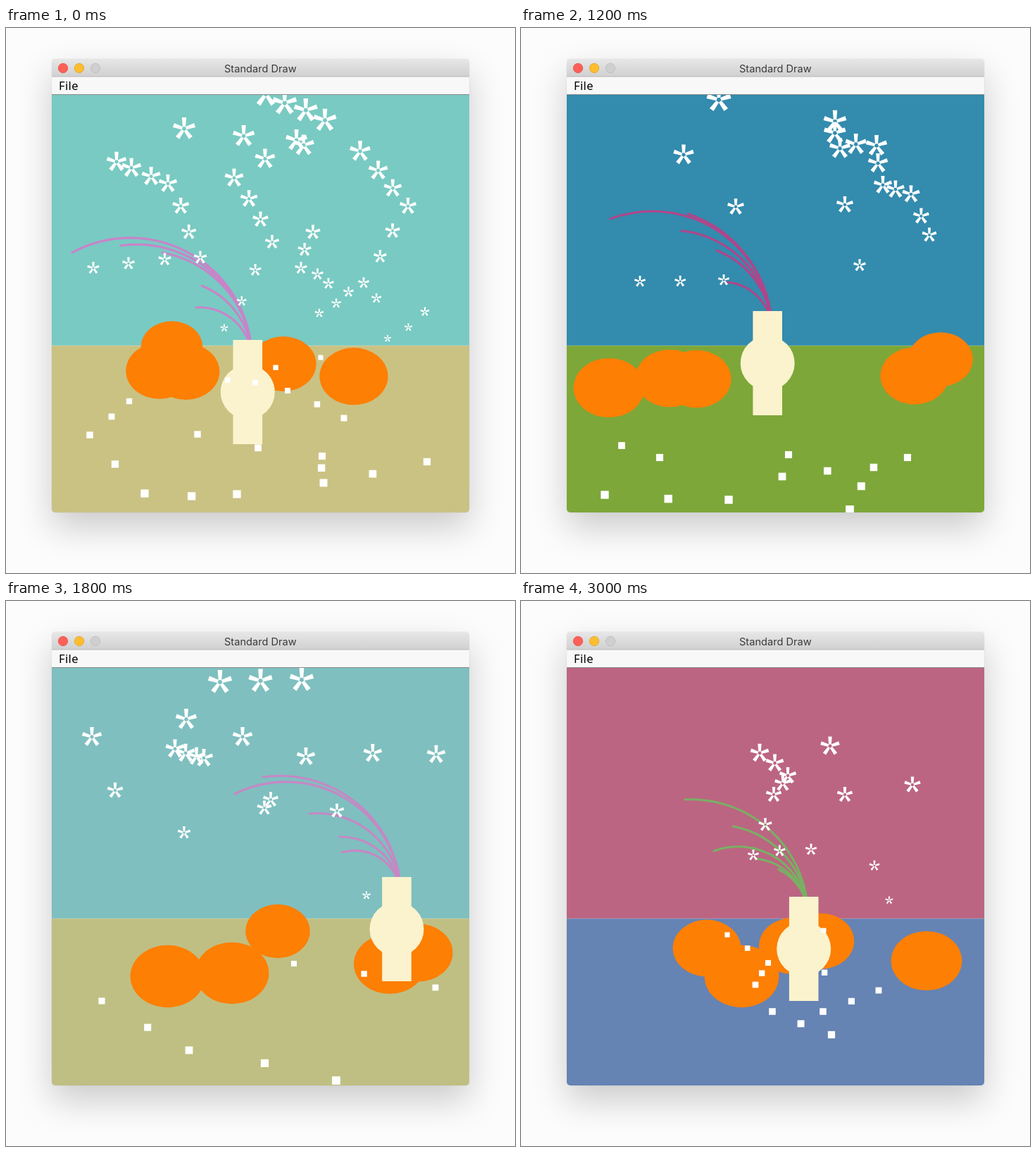
An HTML page that plays this animation: 723x774 px, repeating every 3600 ms.

```html
<!DOCTYPE html>
<html lang="en">
<head>
<meta charset="utf-8">
<title>Standard Draw</title>
<style>
  html, body { margin: 0; width: 100%; height: 100%; overflow: hidden; background: #fcfcfc; }
  .window {
    position: absolute; left: 65px; top: 44px; width: 593px; height: 644px; border-radius: 5px;
    box-shadow: 0 0 1px rgba(0, 0, 0, .3), 0 21px 50px rgba(0, 0, 0, .2);
  }
  svg { position: absolute; left: 0; top: 0; display: block; }
  .scene { visibility: hidden; animation: show 3600ms step-end infinite; }
  @keyframes show {
    0% { visibility: visible; }
    16.6666%, 100% { visibility: hidden; }
  }
</style>
</head>
<body>
<div class="window"></div>
<svg width="723" height="774" viewBox="0 0 723 774">
  <defs>
    <linearGradient id="bar" x2="0" y2="1">
      <stop stop-color="#e7e7e7"/>
      <stop offset="1" stop-color="#d0d0d0"/>
    </linearGradient>
    <clipPath id="frame"><rect x="65" y="44" width="593" height="644" rx="5"/></clipPath>
    <clipPath id="view"><rect x="65" y="94.5" width="593" height="594"/></clipPath>
  </defs>
  <g clip-path="url(#frame)">
    <rect x="65" y="44" width="593" height="25" fill="url(#bar)"/>
    <rect x="65" y="69" width="593" height="25" fill="#f8f8f8"/>
    <rect x="65" y="68.5" width="593" height="1" fill="#bcbcbc"/>
    <g id="canvas" clip-path="url(#view)"></g>
    <rect x="65" y="94" width="593" height="1" fill="#8b8b8b"/>
  </g>
  <g stroke-width=".8">
    <circle cx="81" cy="57" r="6.7" fill="#fc6058" stroke="#e0514a"/>
    <circle cx="104" cy="57" r="6.7" fill="#fdbd2f" stroke="#dfa32b"/>
    <circle cx="127" cy="57" r="6.7" fill="#cfcfcf" stroke="#bababa"/>
  </g>
  <text x="361.3" y="62.5" text-anchor="middle" font-family="Inter, sans-serif" font-size="14.6" fill="#3a3a3a">Standard Draw</text>
  <text x="75" y="88" font-family="'Noto Sans', sans-serif" font-size="16.5" letter-spacing=".4" fill="#000">File</text>
</svg>
<script>
const canvas = document.getElementById('canvas');
let count = 0, seed = 7;

// Seeded random number from -1 to 1
function random() {
  seed = seed * 16807 % 2147483647;
  return seed / 1073741823.5 - 1;
}

function add(parent, tag, attrs) {
  const node = document.createElementNS('http://www.w3.org/2000/svg', tag);
  for (const key in attrs) node.setAttribute(key, attrs[key]);
  return parent.appendChild(node);
}

// Points along a hand-drawn line: each leg is cut into equal steps that stray a little
function trail(steps, ...coords) {
  const points = [];
  for (let i = 0; i + 3 < coords.length; i += 2) {
    const [x0, y0, x1, y1] = coords.slice(i, i + 4);
    for (let k = 0; k < steps; k++) {
      const t = k / steps, stray = 16 * t * (1 - t);
      points.push([x0 + (x1 - x0) * t + random() * stray, y0 + (y1 - y0) * t + random() * stray]);
    }
  }
  points.push(coords.slice(-2));
  return points;
}

const dots = (...coords) => trail(1, ...coords);

// Five tapered arms around a small pentagonal hole, one unit wide
const arm = [[-.07, -.09], [-.105, -.53], [.105, -.53], [.07, -.09]];
const asterisk = [0, 1, 2, 3, 4].map(k => {
  const c = Math.cos(k * Math.PI * .4), s = Math.sin(k * Math.PI * .4);
  return 'M' + arm.map(([x, y]) => `${x * c - y * s} ${x * s + y * c}`).join('L') + 'Z';
}).join('');

function scene(sky, floor, stem, { vase: [vx, vy], oranges, stems, stars, squares }) {
  const g = add(canvas, 'g', { class: 'scene', style: `animation-delay:${count++ * 600 - 3600}ms` });
  const rect = (x, y, width, height, fill) => add(g, 'rect', { x, y, width, height, fill });

  rect(65, 94, 593, 357, sky);
  rect(65, 451, 593, 238, floor);
  rect(65, 450.5, 593, 1, 'rgba(255,255,255,.22)');

  // Everything on the table is larger the nearer it lies
  for (const [cx, cy] of oranges) {
    const rx = cy * .113 - 7.3;
    add(g, 'ellipse', { cx, cy, rx, ry: rx * .835, fill: '#fd7f04' });
  }

  // Circular arcs leaving the vase vertically and ending at a tip
  const x0 = vx + 6, y0 = vy - 46;
  for (const [x, y] of stems) {
    const r = ((x - x0) ** 2 + (y - y0) ** 2) / (2 * (x0 - x));
    add(g, 'path', {
      d: `M${x0} ${y0}A${r} ${r} 0 0 0 ${x} ${y}`,
      fill: 'none', stroke: stem, 'stroke-width': 3.1, 'stroke-linecap': 'round'
    });
  }

  const cream = '#faf3cd';
  rect(vx - 20.8, vy - 74, 41.6, 148, cream);
  add(g, 'circle', { cx: vx, cy: vy, r: 38.5, fill: cream });

  for (const [x, y] of stars.flat()) {
    const size = 10 + (433 - y) * .069;
    add(g, 'path', { d: asterisk, fill: '#fff', transform: `translate(${x} ${y}) scale(${size})` });
  }
  for (const [x, y] of squares.flat()) {
    const size = 7 + (y - 467) * .022;
    rect(x - size / 2, y - size / 2, size, size, '#fff');
  }
}

scene('#79cac2', '#cac283', '#c884c9', {
  vase: [343.3, 517],
  oranges: dots(235.5, 453, 218, 487, 255.5, 488, 394, 477, 494, 494.7),
  stems: dots(94, 319, 163, 309, 222, 319, 278, 366, 270, 397),
  stars: [
    trail(3, 253, 143, 503, 175, 571, 253, 508, 362, 445, 405),
    trail(3, 157, 190, 230, 221, 276, 326, 124, 341),
    trail(3, 369, 94, 453, 131, 324, 213, 378, 304, 310, 426),
    trail(2, 436, 290, 419, 341, 458, 363, 595, 403, 542, 441)
  ],
  squares: [
    trail(2, 447, 468, 315, 500, 400, 515, 480, 554),
    trail(2, 175, 530, 119, 578, 197, 661, 328, 662),
    trail(2, 272, 577, 449, 608, 451, 646, 598, 616)
  ]
});

scene('#a46b70', '#6f70a1', '#6b9d6b', {
  vase: [303.7, 483.3],
  oranges: dots(147, 534, 232, 519, 460, 456.5, 418.5, 504, 462.5, 490),
  stems: dots(79, 266, 168, 333, 207, 359),
  stars: [
    trail(2, 129, 134, 208, 105),
    trail(2, 368, 204, 475, 209),
    trail(2, 231, 236, 317, 284, 398, 293, 462, 303, 525, 244, 641, 239),
    dots(193, 297, 256, 368, 422, 373, 507, 405)
  ],
  squares: [dots(335, 543, 318, 554, 349, 560, 542, 548, 488, 652, 122, 631, 109, 620)]
});

scene('#338bad', '#7da739', '#b2448a', {
  vase: [350.2, 476],
  oranges: dots(125, 511, 211.5, 497.5, 249.5, 498.5, 559, 494, 596, 470.5),
  stems: dots(127, 271, 237, 264, 228, 288, 278, 316, 293, 361),
  stars: [
    trail(2, 446, 133, 453, 171, 505, 167, 514, 223, 554, 236, 580, 294),
    dots(281, 102, 231, 180, 305, 254, 460, 251, 481, 337),
    trail(2, 169, 360, 288, 358)
  ],
  squares: [
    dots(143, 593, 197, 610, 380, 606, 549, 610),
    trail(2, 371, 637, 501, 624, 467, 684),
    trail(2, 119, 663, 295, 670)
  ]
});

scene('#7fbfbf', '#bfbf83', '#c588c4', {
  vase: [555, 466],
  oranges: dots(229.5, 533, 321, 528.5, 386, 469, 545, 515.5, 585.5, 499.5),
  stems: dots(325, 274, 365, 250, 431, 302, 474, 335, 477, 357),
  stars: [
    trail(2, 304, 115, 420, 112),
    dots(122, 193, 256, 168, 336, 193),
    trail(3, 240, 210, 281, 223),
    trail(2, 426, 221, 611, 218),
    dots(155, 269, 253, 329, 367, 294, 376, 282, 470, 298, 512, 418)
  ],
  squares: [
    trail(2, 409, 515, 610, 549),
    trail(2, 136, 568, 260, 638, 469, 681)
  ]
});

scene('#668da2', '#8aa268', '#b05f8e', {
  vase: [369, 534.5],
  oranges: dots(124.5, 453, 203.5, 459.3, 285.5, 487.5, 554.5, 468.7, 597, 535),
  stems: dots(178, 370, 205, 331, 264, 416, 302, 420, 312, 409),
  stars: [
    dots(92, 167, 104, 167),
    trail(4, 191, 167, 417, 158, 572, 154),
    trail(3, 319, 198, 629, 195),
    trail(2, 217, 251, 373, 251, 557, 251),
    trail(2, 490, 276, 627, 276),
    trail(2, 67, 297, 145, 297),
    dots(260, 297, 345, 298),
    trail(3, 386, 345, 568, 335)
  ],
  squares: [
    trail(3, 193, 570, 352, 585, 473, 560, 535, 554, 585, 555),
    trail(5, 116, 651, 245, 653, 386, 652),
    trail(5, 417, 636, 542, 623, 619, 634)
  ]
});

scene('#bb6582', '#6583b3', '#79b063', {
  vase: [401.7, 494],
  oranges: dots(264, 493, 313.5, 533, 386, 490, 426, 483, 576, 511),
  stems: dots(233, 282, 301, 320, 274, 355, 334, 366, 366, 381),
  stars: [
    trail(2, 339, 216, 379, 248, 359, 275, 330, 361, 412, 353),
    dots(439, 206, 460, 275, 556, 261, 502, 376, 523, 425)
  ],
  squares: [
    trail(2, 293, 474, 351, 514, 333, 545),
    trail(2, 430, 468, 429, 583, 508, 553),
    trail(2, 357, 583, 441, 616)
  ]
});
</script>
</body>
</html>
```
